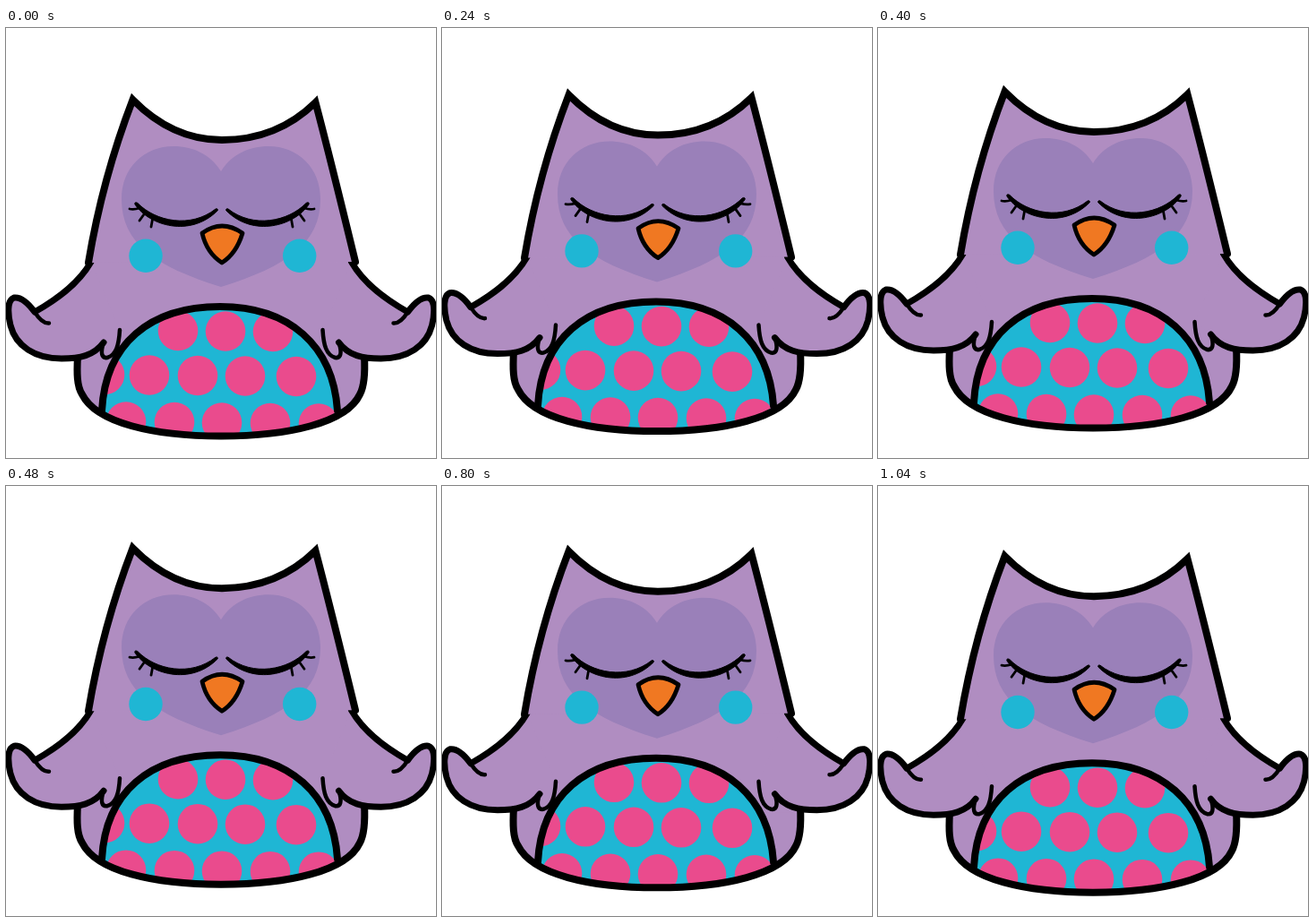
Recreate the animation shown at these times as an HTML page. Size 480 px wide and 480 px high, loop 1120 ms.

```html
<!DOCTYPE html>
<html lang="en">
<head>
<meta charset="utf-8">
<title>Floating owl</title>
<style>
  html, body { margin: 0; width: 100%; height: 100%; overflow: hidden; background: #fff; }
  svg { display: block; width: 100%; height: 100%; }
  .skin { fill: #b08dc1; }
  .line { stroke: #000; stroke-width: 7; stroke-linecap: round; }
  .bold { stroke-width: 8; }
  .fine { stroke-width: 4.5; }
  .thin { stroke-width: 2.8; }
  .open { fill: none; }
  .heart { fill: #9a80b9; }
  .blue { fill: #1fb6d4; }
  .pink { fill: #ea4b8d; }
</style>
</head>
<body>
<svg viewBox="0 0 480 480">
  <defs>
    <path id="base" d="M80 366C79 385 79 400 85 409C101 441 165 455.5 240 455.5C315 455.5 380 441 395 409C400 400 401 385 400 366"/>
    <path id="dome" d="M107 427C111 353 160 311 239 311C316 311 365 354 370 427"/>
    <clipPath id="belly"><path d="M107 427C111 353 160 311 239 311C316 311 365 354 370 427C330 465 150 465 107 427Z"/></clipPath>
    <g id="wing">
      <path class="skin" d="M95 261C80 287 55 304 32 317C24 306 16 300 9 301C1 304 2 319 5 332C11 355 32 369 62 369C82 369 98 366 109 351L127 337Z"/>
      <path class="line open" stroke-linejoin="round" d="M95 261C80 287 55 304 32 317C24 306 16 300 9 301C1 304 2 319 5 332C11 355 32 369 62 369C82 369 98 366 109 351"/>
      <path class="line fine open" d="M32 317C37 325 42 330 48 329.5M109 351C105 363 107 369 113 368C123 365 126 354 127 337"/>
    </g>
    <g id="eye">
      <path d="M144 197C160 221 206 234 236 204C237 203 236 201 234 202C206 224 167 216 147 195.5C145 194 143 195 144 197Z" stroke="#000"/>
      <path class="line thin open" d="M138 202Q143 203 149 201M154 208L149 215M164 211L162 222"/>
    </g>
  </defs>
  <g id="owl">
    <use href="#base" class="skin"/>
    <path class="skin" d="M95 255H388V372H95Z"/>
    <g clip-path="url(#belly)">
      <path class="blue" d="M100 300H380V460H100Z"/>
      <g id="dots" class="pink"></g>
    </g>
    <use href="#dome" class="line bold open"/>
    <use href="#base" class="line bold open"/>
    <use href="#wing"/>
    <use href="#wing" transform="matrix(-1 0 0 1 480.5 0)"/>
    <path class="skin line bold" stroke-miterlimit="8" d="M92 262C101 208 118 141 141.5 80C172 111 204 125 241 125C282 125 316 112 345.5 83C360 138 374 195 390 261"/>
    <path class="heart" d="M240 160C228 141 209 132 187 132C154 132 129 156 129 191C129 240 166 266 240 289C314 266 351 240 351 191C351 156 326 132 293 132C271 132 252 141 240 160Z"/>
    <use href="#eye"/>
    <use href="#eye" transform="matrix(-1 0 0 1 482 0)"/>
    <circle class="blue" cx="156" cy="254.3" r="18.7"/>
    <circle class="blue" cx="327.7" cy="254.3" r="18.7"/>
    <path fill="#f07822" stroke="#000" stroke-width="4.8" stroke-linejoin="round" d="M219 229Q241 213 264 229Q257 252 241 262Q224 251 219 229Z"/>
  </g>
</svg>
<script>
const owl = document.getElementById('owl');
const dots = document.getElementById('dots');
const STEP = 80, STEPS = 14, RISE = 1.8;

// Each row: y of its first dot, then the x positions
const rows = [
  [338, 192, 245, 298],
  [387, 110, 160, 214, 267, 324],
  [439.5, 134, 188, 241, 295, 349],
];
for (const [y, ...xs] of rows) {
  xs.forEach((x, i) => {
    const dot = document.createElementNS('http://www.w3.org/2000/svg', 'circle');
    dot.setAttribute('cx', x);
    dot.setAttribute('cy', y + i * 0.5);
    dot.setAttribute('r', 22.3);
    dots.append(dot);
  });
}

function draw(now) {
  const step = Math.floor(now / STEP) % STEPS;
  const lift = RISE * Math.min(step, STEPS - step);
  owl.setAttribute('transform', `translate(0 ${-lift})`);
  requestAnimationFrame(draw);
}
draw(performance.now());
</script>
</body>
</html>
```
